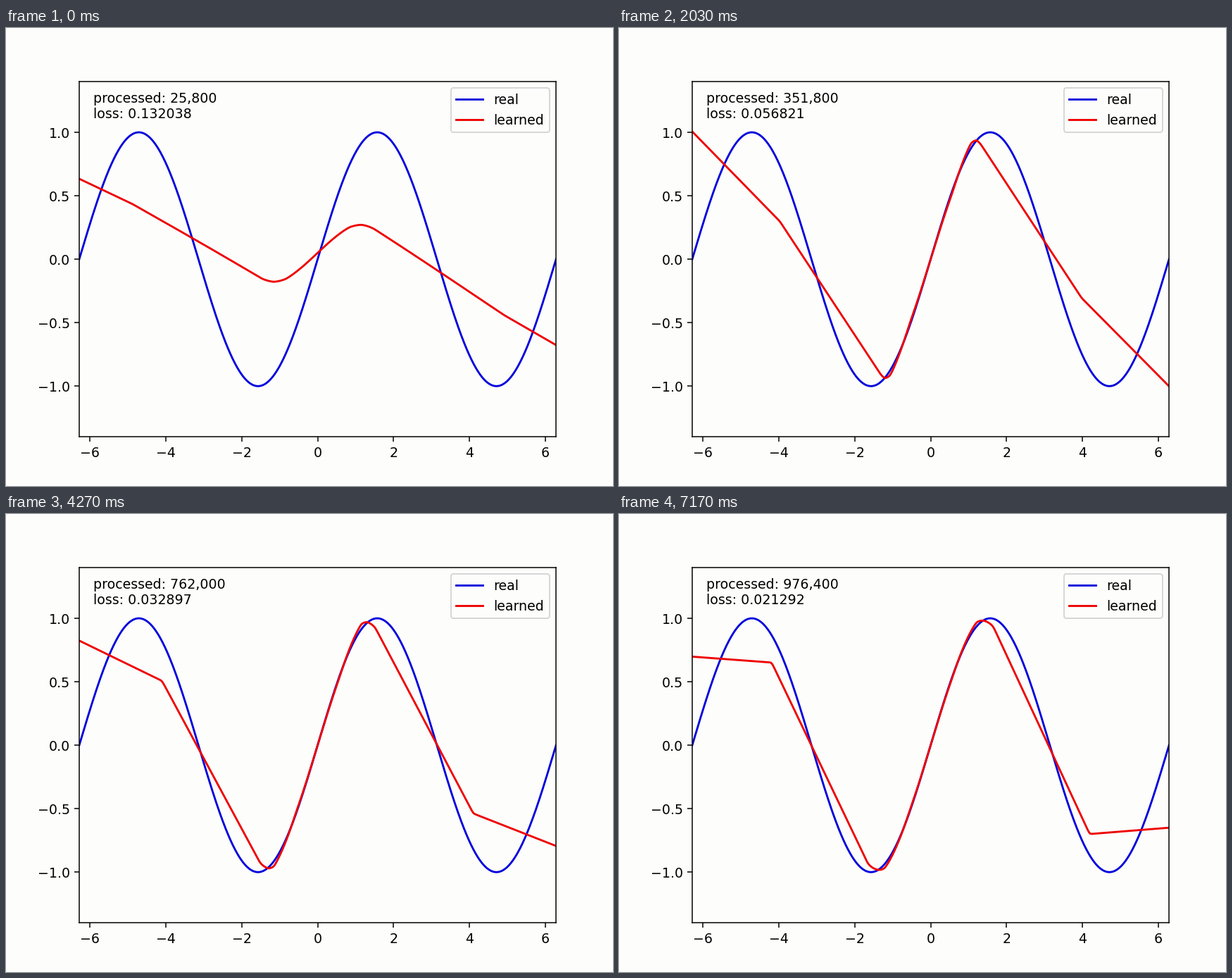
Write a matplotlib script that moves like this. It is 862 px wide and 650 px high and loops after 7.2 s.

```python
import matplotlib.pyplot as plt
import numpy as np
from matplotlib.animation import FuncAnimation

W, H, DPI = 862, 650, 128
FRAMES, LOOP_MS = 216, 7200
LEFT, RIGHT, TOP, BOTTOM = 104, 781.1, 76, 580.3
K = 136.5 / DPI  # scale of the default matplotlib sizes
BG, BLUE, RED = "#fdfdfc", "#0000dc", "#ee0000"

plt.rcParams.update({
    "font.family": "DejaVu Sans",
    "font.size": 10 * K,
    "lines.linewidth": 1.5 * K,
    "axes.linewidth": 0.8 * K,
    "patch.linewidth": 1.0 * K,
    **{f"{a}tick.major.{p}": v * K
       for a in "xy" for p, v in (("size", 3.5), ("pad", 3.5), ("width", 0.8))},
})

# Training log: frame, samples seen, loss
WHEN = [0, 30, 60, 111, 146, 174]
SEEN = [25800, 178000, 351800, 682600, 846000, 976400]
LOSS = [0.132038, 0.063540, 0.056821, 0.038081, 0.028176, 0.021292]

# Right half of the learned curve: slope, three peak points, kink, end
END = 2 * np.pi
START = np.array([(0.55, 0.145), (0.84, 0.204), (1.15, 0.225),
                  (1.49, 0.194), (4.9, -0.438), (END, -0.655)])
RISEN = np.array([(0.55, 0.493), (1.046, 0.857), (1.187, 0.895),
                  (1.28, 0.876), (3.95, -0.256), (END, -1.044)])
FINAL = np.array([(0.55, 0.514), (1.215, 0.971), (1.364, 0.983),
                  (1.651, 0.935), (4.19, -0.676), (END, -0.674)])

x = np.linspace(-END, END, 800)
taps = np.arange(-8, 9)
kernel = np.exp(-0.5 * (taps / 2.0) ** 2)
kernel /= kernel.sum()


def learned_curve(rise, bend):
    """Odd curve: sine-like core, straight flanks, softened corners."""
    grow = np.full(FINAL.shape, bend)
    grow[:4, 1] = bend ** 0.3  # the peak reaches its height early
    pose = RISEN + (FINAL - RISEN) * grow
    px, py = np.vstack([(0, 0), START + (pose - START) * rise]).T

    r = np.abs(x)
    arch = 0.35 + 0.65 * rise
    core = arch * np.sin(r) + np.interp(r, px, py - arch * np.sin(px))
    half = np.where(r < px[4], core, np.interp(r, px, py))

    lift = 0.05 * (1 - rise) * np.cos(0.32 * x)
    skew = 0.024 * bend * np.interp(r, px[4:], [0, -1, 1])
    y = np.sign(x) * half + lift + skew
    y = np.pad(y, len(taps) // 2, mode="reflect", reflect_type="odd")
    return np.convolve(y, kernel, mode="valid")


fig = plt.figure(figsize=(W / DPI, H / DPI), dpi=DPI, facecolor=BG)
ax = fig.add_axes([LEFT / W, 1 - BOTTOM / H, (RIGHT - LEFT) / W,
                   (BOTTOM - TOP) / H], facecolor=BG)
ax.set(xlim=(-END, END), ylim=(-1.4, 1.4),
       xticks=np.arange(-6, 7, 2), yticks=np.arange(-1, 1.1, 0.5))
ax.plot(x, np.sin(x), color=BLUE, label="real")
learned, = ax.plot(x, 0 * x, color=RED, label="learned")
ax.legend(loc="upper right", facecolor=BG)
info = ax.text(0.03, 0.97, "", transform=ax.transAxes, va="top")


def update(frame):
    seen = np.interp(frame, WHEN, SEEN)
    loss = np.exp(np.interp(frame, WHEN, np.log(LOSS)))
    first = np.interp(seen, SEEN[:2], [0, 1])
    rest = np.interp(seen, [SEEN[1], SEEN[-1]], [0, 1])
    learned.set_ydata(learned_curve(1 - (1 - first) ** 2, rest ** 1.45))
    info.set_text(f"processed: {round(seen / 200) * 200:,}\nloss: {loss:.6f}")
    return learned, info


anim = FuncAnimation(fig, update, frames=FRAMES, interval=LOOP_MS / FRAMES,
                     repeat=True, repeat_delay=0)
plt.show()
```
